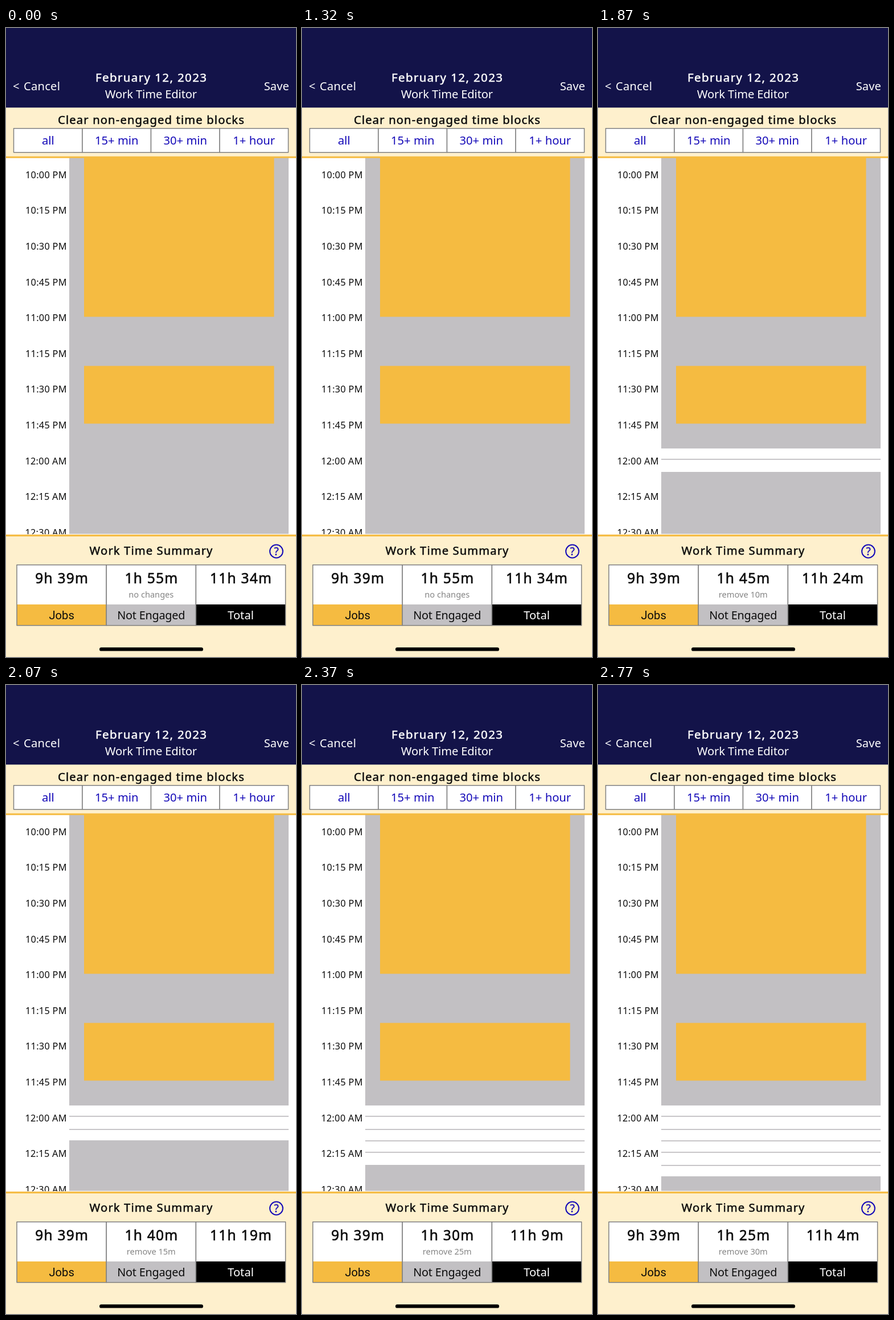
An HTML page with a canvas that plays this animation: 509x1101 px, repeating every 2.87 s.

```html
<!DOCTYPE html>
<html lang="en">
<head>
<meta charset="utf-8">
<title>Work Time Editor</title>
<style>
html, body { margin: 0; width: 100%; height: 100%; overflow: hidden; background: #fff; }
canvas { display: block; width: 509px; height: 1101px; }
</style>
</head>
<body>
<canvas id="stage"></canvas>
<script>
const W = 509, H = 1101, LOOP = 2870;
const NAVY = '#131349', CREAM = '#fef0cd', AMBER = '#f5bb41', GRAY = '#c2c0c3';
const BORDER = '#808080', BLUE = '#1409b8', INK = '#0c0c0c';
const SANS = '"Noto Sans", "Open Sans", sans-serif';

// Moments at which one more five-minute slot is erased, and where each slot ends
const ERASE_AT = [1570, 1800, 2070, 2170, 2370, 2570];
const SLOT_END = [754, 777, 797, 817, 840, 860];
const ERASE_TOP = 736;
const GRID = { x: 111, y: 227, w: 385, bottom: 885.5 };

const canvas = document.getElementById('stage');
const ctx = canvas.getContext('2d');
const dpr = window.devicePixelRatio || 1;
canvas.width = Math.round(W * dpr);
canvas.height = Math.round(H * dpr);
ctx.scale(dpr, dpr);

function box(x, y, w, h, color) {
  ctx.fillStyle = color;
  ctx.fillRect(x, y, w, h);
}

function frame(x, y, w, h) {
  ctx.strokeStyle = BORDER;
  ctx.lineWidth = 1.5;
  ctx.strokeRect(x, y, w, h);
}

function text(str, x, y, { size = 20.2, color = INK, align = 'center', gap = 0, bold = 0, family = SANS } = {}) {
  ctx.font = `400 ${size}px ${family}`;
  ctx.letterSpacing = gap + 'px';
  ctx.textAlign = align;
  ctx.fillStyle = color;
  const shift = { left: 0, center: gap / 2, right: gap }[align];
  ctx.fillText(str, x + shift, y);
  if (bold) {
    ctx.strokeStyle = color;
    ctx.lineWidth = bold;
    ctx.lineJoin = 'round';
    ctx.strokeText(str, x + shift, y);
  }
}

function duration(minutes) {
  return `${Math.floor(minutes / 60)}h ${minutes % 60}m`;
}

function drawHeader() {
  box(0, 0, W, 139.5, NAVY);
  text('<', 12, 108.5, { color: '#fff', align: 'left' });
  text('Cancel', 31, 108.5, { color: '#fff', align: 'left', gap: 0.2 });
  text('Save', 497, 108.5, { color: '#fff', align: 'right', gap: 0.1 });
  text('February 12, 2023', 254.5, 94.2, { size: 20.5, color: '#fff', gap: 1.39, bold: 0.5 });
  text('Work Time Editor', 254.5, 122.6, { color: '#fff', gap: -0.15 });
}

function drawClearBar() {
  box(0, 139.5, W, 85.5, CREAM);
  text('Clear non-engaged time blocks', 254.5, 168, { gap: 1.14, bold: 0.5 });
  const cell = 120.5;
  ['all', '15+ min', '30+ min', '1+ hour'].forEach((label, i) => {
    const x = 13.5 + i * cell;
    box(x, 175.7, cell, 42, '#fff');
    frame(x, 175.7, cell, 42);
    text(label, x + cell / 2, 204.4, { color: BLUE });
  });
  box(0, 224.7, W, 3, AMBER);
}

function drawTimeline(erased) {
  box(0, 227, W, 660, '#fff');
  box(GRID.x, GRID.y, GRID.w, GRID.bottom - GRID.y, GRAY);
  box(137, 225, 333.5, 280.5, AMBER);
  box(137, 591.5, 333.5, 101, AMBER);

  if (erased) {
    box(GRID.x, ERASE_TOP, GRID.w, SLOT_END[erased - 1] - ERASE_TOP, '#fff');
    for (const y of SLOT_END.slice(0, erased - 1)) box(GRID.x, y, GRID.w, 1.8, GRAY);
  }

  ctx.save();
  ctx.beginPath();
  ctx.rect(0, 227, GRID.x, 659);
  ctx.clip();
  for (let i = 0; i <= 10; i++) {
    const min = 22 * 60 + i * 15;
    const hour = Math.floor(min / 60) % 12 || 12;
    const label = `${hour}:${String(min % 60).padStart(2, '0')} ${min < 1440 ? 'PM' : 'AM'}`;
    text(label, 106.5, 262.8 + i * 62.6, { size: 16.3, align: 'right', gap: 0.3 });
  }
  ctx.restore();
}

function drawSummary(erased) {
  const removed = erased * 5;
  box(0, 886.7, W, 3.2, AMBER);
  box(0, 889.9, W, H - 889.9, CREAM);
  text('Work Time Summary', 254.5, 922, { gap: 1.1, bold: 0.5 });

  ctx.strokeStyle = BLUE;
  ctx.lineWidth = 2;
  ctx.beginPath();
  ctx.arc(474.5, 916, 11.4, 0, Math.PI * 2);
  ctx.stroke();
  text('?', 474.5, 922.8, { size: 19, color: BLUE, bold: 0.3 });

  const cell = 157.2;
  const columns = [
    { name: 'Jobs', minutes: 579, color: AMBER, style: { family: 'Roboto, sans-serif' } },
    { name: 'Not Engaged', minutes: 115 - removed, color: GRAY, style: { size: 19.8, gap: -0.2 } },
    { name: 'Total', minutes: 694 - removed, color: '#000', style: { color: '#fff' } }
  ];
  columns.forEach((col, i) => {
    const x = 19 + i * cell, mid = x + cell / 2;
    box(x, 939.7, cell, 106, '#fff');
    box(x, 1009, cell, 36.7, col.color);
    frame(x, 939.7, cell, 106);
    text(duration(col.minutes), mid, 972.3, { size: 24.5, gap: 1.25, bold: 0.6 });
    text(col.name, mid, 1035.2, col.style);
  });
  const note = removed ? `remove ${removed}m` : 'no changes';
  text(note, 19 + cell * 1.5, 997.3, { size: 14.6, color: '#858585' });

  ctx.fillStyle = '#000';
  ctx.beginPath();
  ctx.roundRect(164, 1084.2, 182, 6.4, 3.2);
  ctx.fill();
}

function draw(now) {
  const t = now % LOOP;
  const erased = ERASE_AT.filter(at => t >= at).length;
  drawTimeline(erased);
  drawHeader();
  drawClearBar();
  drawSummary(erased);
}

const start = performance.now();
function tick() {
  draw(performance.now() - start);
  requestAnimationFrame(tick);
}
tick();
</script>
</body>
</html>
```
